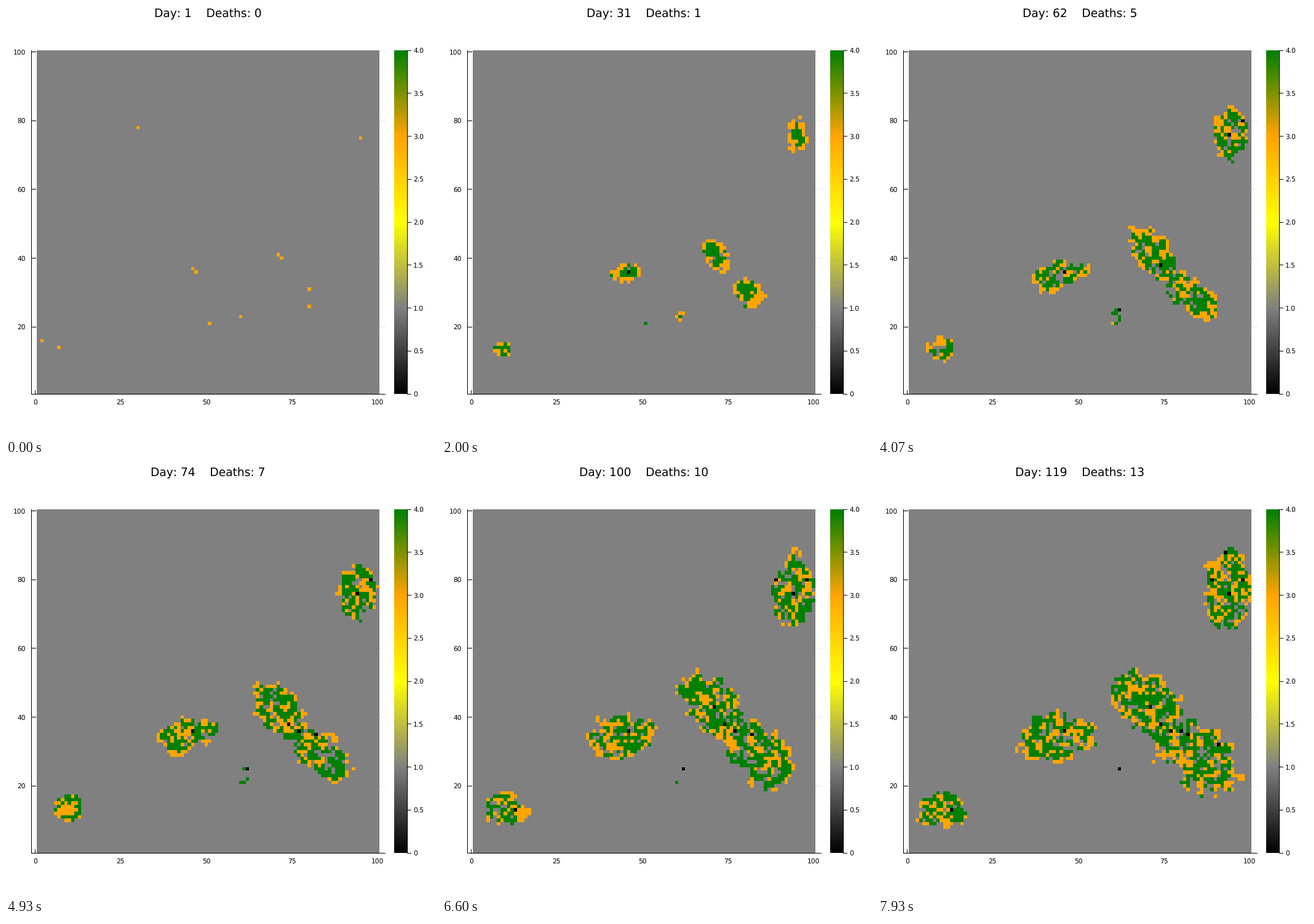
Animation, 699 px wide and 700 px high, one loop 8000 ms. Source, as a matplotlib script:

```python
import matplotlib.pyplot as plt
import numpy as np
from matplotlib.animation import FuncAnimation
from matplotlib.colors import LinearSegmentedColormap

W, H, DPI = 699, 700, 100
PX = 72 / DPI
DAYS, SIZE = 120, 100
LEFT, RIGHT, TOP, BOTTOM = 50, 607, 72, 630
DEAD, WELL, SICK, IMMUNE = 0, 1, 3, 4

plt.rcParams["font.family"] = "DejaVu Sans"
plt.rcParams["text.hinting"] = "none"
plt.rcParams["text.kerning_factor"] = 6

FIRST_CASES = [(2, 16), (7, 14), (30, 78), (46, 37), (47, 36), (51, 21),
               (60, 23), (71, 41), (72, 40), (80, 31), (80, 26), (95, 75)]
DEATHS = [(46, 36), (94, 76), (74, 38), (98, 80), (62, 25), (77, 36), (82, 35),
          (89, 80), (13, 13), (71, 43), (80, 36), (93, 88), (91, 32)]
FIRST_DEATH, DEATH_GAP = 27, 7.6

# Outbreak zones: first centre, last centre, last radii, tilt, last active day
ZONES = [
    ((9, 13.5), (10.5, 13.5), (6.5, 5.4), 0, DAYS),
    ((46, 36), (43.5, 34.2), (11.5, 7), 8, DAYS),
    ((61, 23.5), (61, 23.5), (3, 4), 0, 60),
    ((72, 40.5), (71.5, 42.5), (14, 8), -50, DAYS),
    ((80, 30.5), (86, 27.5), (13, 8.5), -40, DAYS),
    ((95.5, 75), (93.3, 77), (7, 12), 0, DAYS),
]


def in_zones(day, edge):
    """Cells the outbreaks can reach: tilted ellipses that grow and drift."""
    y, x = np.mgrid[1:SIZE + 1, 1:SIZE + 1]
    u = day / DAYS
    reach = np.zeros((SIZE, SIZE), bool)
    for start, end, radii, tilt, last in ZONES:
        if day > last:
            continue
        cx, cy = np.array(start) * (1 - u) + np.array(end) * u
        c, s = np.cos(np.radians(tilt)), np.sin(np.radians(tilt))
        along = ((x - cx) * c + (y - cy) * s) / radii[0]
        across = ((y - cy) * c - (x - cx) * s) / radii[1]
        reach |= np.hypot(along, across) < u ** .6 * edge
    return reach


def sum_around(a):
    """Sum of each cell's 3 x 3 block."""
    rows = a + np.roll(a, 1, 0) + np.roll(a, -1, 0)
    return rows + np.roll(rows, 1, 1) + np.roll(rows, -1, 1)


def simulate():
    rng = np.random.default_rng(5)
    state = np.full((SIZE, SIZE), WELL)
    left = np.zeros((SIZE, SIZE), int)
    edge = 1 + .12 * sum_around(rng.normal(size=state.shape)) / 3
    for x, y in FIRST_CASES:
        state[y - 1, x - 1] = SICK
        left[y - 1, x - 1] = rng.integers(8, 15)

    days = [state.copy()]
    for day in range(2, DAYS + 1):
        left -= 1
        chance = .03 + .06 * sum_around((state == SICK).astype(int))
        caught = ((state == WELL) & in_zones(day, edge)
                  & (rng.random(state.shape) < chance))
        healed = (state == SICK) & (left <= 0)
        exposed = (state == IMMUNE) & (left <= 0)
        state[exposed] = WELL
        state[healed] = IMMUNE
        left[healed] = rng.integers(8, 42, healed.sum())
        state[caught] = SICK
        left[caught] = rng.integers(8, 18, caught.sum())
        for k, (x, y) in enumerate(DEATHS):
            if day >= FIRST_DEATH + k * DEATH_GAP:
                state[y - 1, x - 1] = DEAD
        days.append(state.copy())
    return days


history = simulate()
cmap = LinearSegmentedColormap.from_list(
    "health", ["#000000", "#808080", "#ffff00", "#ffa500", "#008000"], N=1025)

fig = plt.figure(figsize=(W / DPI, H / DPI), dpi=DPI, facecolor="white")
ax = fig.add_axes([0, 0, 1, 1])


def line(xs, ys, **style):
    """A crisp line through pixel centres."""
    xs, ys = np.floor(xs) + .5, np.floor(ys) + .5
    ax.plot(xs, ys, **{"color": "black", "lw": PX, "zorder": 1,
                       "snap": False, **style})


def label(x, y, text, ha):
    ax.text(x, y + 3.9, text, ha=ha, va="baseline", fontsize=10.67 * PX)


def show(data, left, right):
    inset = .02  # keeps the edges from spilling into the next pixel
    box = (left + inset, right - inset, BOTTOM - inset, TOP + inset)
    return ax.imshow(data, cmap=cmap, vmin=0, vmax=4, extent=box, aspect="auto",
                     origin="lower", interpolation="nearest", zorder=2)


field = show(history[0], LEFT, RIGHT)
show(np.linspace(0, 4, BOTTOM - TOP)[:, None], 631, 652)

for v in range(0, 101, 25):
    x = LEFT + (v - .5) * (RIGHT - LEFT) / SIZE
    line([x, x], [TOP, BOTTOM], alpha=.08)
    line([x, x], [BOTTOM - 6, BOTTOM - 1])
    label(x, 642.5, str(v), "center")
for v in range(20, 101, 20):
    y = BOTTOM - (v - .5) * (BOTTOM - TOP) / SIZE
    line([41, 617], [y, y], alpha=.08)
    line([41, 48], [y, y])
    label(32, y, str(v), "right")
line([41, 41], [TOP, BOTTOM], zorder=3)
line([41, 616], [BOTTOM, BOTTOM], zorder=3)

line([652, 652], [TOP, BOTTOM], zorder=3)
for i in range(9):
    y = BOTTOM - i * (BOTTOM - TOP) / 8
    line([652, 658], [y, y], zorder=3)
    label(662, y, str(i / 2) if i else "0", "left")

title = ax.text(328.5, 17.7, "", ha="center", va="baseline",
                fontsize=18.67 * PX)
ax.set_xlim(0, W)
ax.set_ylim(H, 0)
ax.axis("off")


def draw(i):
    deaths = np.count_nonzero(history[i] == DEAD)
    field.set_data(history[i])
    title.set_text(f"Day: {i + 1}    Deaths: {deaths}")
    return field, title


anim = FuncAnimation(fig, draw, frames=DAYS, interval=8000 / DAYS,
                     repeat=True, repeat_delay=0, blit=False)
plt.show()
```
